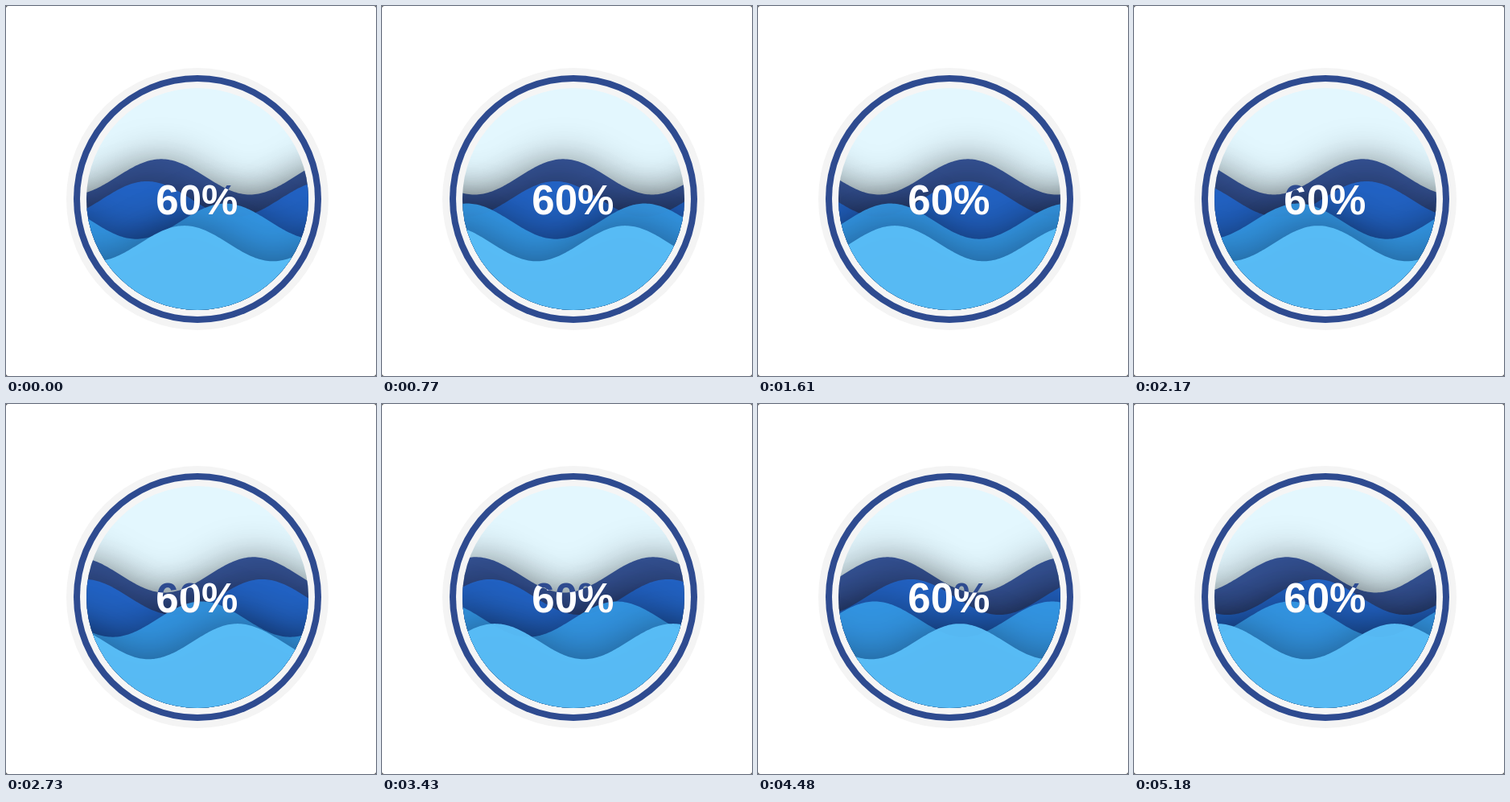
These frames come from a looping animation (460 by 460 pixels, 5250 ms). An HTML page with a canvas:

```html
<!DOCTYPE html>
<html lang="en">
<head>
<meta charset="utf-8">
<title>Liquid gauge</title>
<style>
html, body { margin: 0; width: 100%; height: 100%; overflow: hidden; background: #444; }
canvas { display: block; width: 460px; height: 460px; background: #fff; border-radius: 3px; }
</style>
</head>
<body>
<canvas id="stage" width="460" height="460"></canvas>
<script>
const ctx = document.getElementById('stage').getContext('2d');
const LOOP = 5250, STEP = 70;
const CX = 238, CY = 240, R = 138;
const LENGTH = R * 1.6, AMPLITUDE = R * 0.16;
const NAVY = '#2e4b90';

// level: filled share, crest: x of a crest at time 0, period: ms per wavelength
const waves = [
  { level: 0.6, color: NAVY, crest: 193, period: LOOP },
  { level: 0.5, color: '#2265c8', crest: 175, period: LOOP * 0.8 },
  { level: 0.4, color: '#3497e4', crest: 272.5, period: LOOP * 0.6 },
  { level: 0.3, color: '#5abff9', crest: 221.5, period: LOOP * 0.4 }
];

function disc(radius, color) {
  ctx.beginPath();
  ctx.arc(CX, CY, radius, 0, 2 * Math.PI);
  ctx.fillStyle = color;
  ctx.fill();
}

function wavePath({ level, crest, period }, time) {
  const path = new Path2D();
  const base = CY + R - level * 2 * R;
  const peak = crest + LENGTH * time / period;
  for (let x = -100; x <= 560; x += 2) {
    path.lineTo(x, base - AMPLITUDE * Math.cos(2 * Math.PI * (x - peak) / LENGTH));
  }
  path.lineTo(560, 460);
  path.lineTo(-100, 460);
  path.closePath();
  return path;
}

function label(color) {
  ctx.font = 'bold 51px "Liberation Sans", Arial, sans-serif';
  ctx.textAlign = 'center';
  ctx.fillStyle = color;
  ctx.fillText('60%', 237.3, 259);
}

function draw(time) {
  ctx.clearRect(0, 0, 460, 460);
  disc(163, '#f4f4f4');
  disc(154, NAVY);
  disc(146, '#f5f5f5');
  disc(R, '#e3f7fe');

  const paths = waves.map(wave => wavePath(wave, time));

  ctx.save();
  ctx.beginPath();
  ctx.arc(CX, CY, R, 0, 2 * Math.PI);
  ctx.clip();
  ctx.globalAlpha = 0.95;
  ctx.shadowBlur = 50;
  ctx.shadowColor = 'rgba(0,0,0,0.4)';
  waves.forEach((wave, i) => {
    ctx.fillStyle = wave.color;
    ctx.fill(paths[i]);
  });
  ctx.restore();

  // The label turns white where the back wave covers it
  label(NAVY);
  ctx.save();
  ctx.clip(paths[0]);
  label('#fff');
  ctx.restore();
}

const start = performance.now();
function tick() {
  const time = (performance.now() - start) % LOOP;
  draw(Math.floor(time / STEP) * STEP);
  requestAnimationFrame(tick);
}
tick();
</script>
</body>
</html>
```
